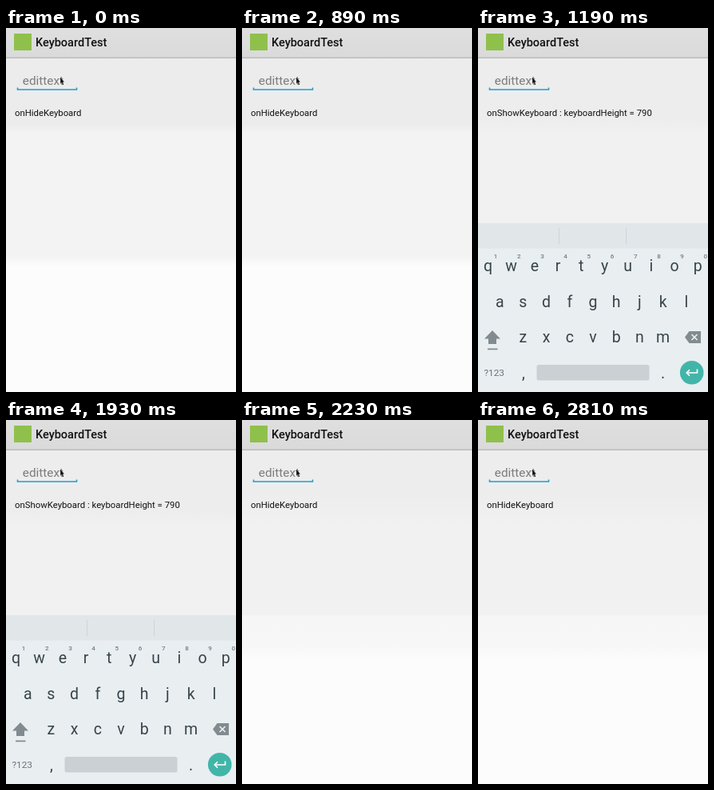
Animation, 288 px wide and 455 px high, one loop 2960 ms. Source, as an HTML page:

```html
<!DOCTYPE html>
<html lang="en">
<head>
<meta charset="utf-8">
<title>Keyboard test</title>
<style>
  html, body { margin: 0; width: 100%; height: 100%; overflow: hidden; background: #fbfbfb; }
  svg { display: block; width: 288px; height: 455px; font-family: Roboto, sans-serif; }
  .keys { font-size: 19.5px; fill: #37444a; text-anchor: middle; }
  .digits { font-size: 8px; font-weight: 500; fill: #737e83; text-anchor: middle; }
</style>
</head>
<body>
<svg viewBox="0 0 288 455">
  <defs>
    <linearGradient id="bar" x2="0" y2="1">
      <stop stop-color="#dfdfdf"/><stop offset="1" stop-color="#dadada"/>
    </linearGradient>
    <linearGradient id="idle" gradientUnits="userSpaceOnUse" x1="0" y1="0" x2="0" y2="455">
      <stop offset=".262" stop-color="#ececec"/><stop offset=".29" stop-color="#f3f3f3"/>
      <stop offset=".624" stop-color="#f3f3f3"/><stop offset=".655" stop-color="#fcfcfc"/>
    </linearGradient>
    <linearGradient id="shrunk" gradientUnits="userSpaceOnUse" x1="0" y1="0" x2="0" y2="455">
      <stop offset=".2" stop-color="#ededed"/><stop offset=".29" stop-color="#f1f1f1"/>
      <stop offset=".536" stop-color="#f1f1f1"/><stop offset=".536" stop-color="#f6f6f6"/>
      <stop offset=".62" stop-color="#f7f7f7"/><stop offset=".66" stop-color="#fcfcfc"/>
    </linearGradient>
    <linearGradient id="open" gradientUnits="userSpaceOnUse" x1="0" y1="0" x2="0" y2="455">
      <stop offset=".25" stop-color="#ededed"/><stop offset=".29" stop-color="#f1f1f1"/>
      <stop offset=".552" stop-color="#f1f1f1"/><stop offset=".552" stop-color="#fafafa"/>
    </linearGradient>
  </defs>

  <rect id="page" width="288" height="455"/>
  <rect width="288" height="37" fill="url(#bar)"/>
  <rect y="36.5" width="288" height="1.5" fill="#bbb"/>
  <rect x="10" y="7" width="22" height="21" fill="#8fc04b"/>
  <text x="37" y="23" font-size="14.5" font-weight="500" fill="#111">KeyboardTest</text>

  <text x="20.8" y="71" font-size="15.3" fill="#7c7c7c">edittext</text>
  <path d="M14.5 74.5V77H88.5V74.5" fill="none" stroke="#209fd0" stroke-width="1.6"/>
  <rect id="caret" x="20" y="55" width="1.6" height="20" fill="#209fd0"/>
  <path d="M68.2 62V69.2L69.8 67.8L71.2 71L72.2 70.5L70.9 67.4H73Z" fill="#111"/>
  <text id="status" x="11" y="109.5" font-size="11.35" fill="#111"></text>

  <g id="keyboard">
    <rect y="244" width="288" height="220" fill="#e9eef1"/>
    <rect y="244" width="288" height="31.5" fill="#e1e6e9"/>
    <path d="M101.5 250V270M185.5 250V270" stroke="#cdd3d6"/>
    <g id="keys" class="keys"></g>
    <g id="digits" class="digits"></g>
    <path d="M18 378L28 388.5H23V395H13V388.5H8ZM12 400.5H24.5V402.2H12Z" fill="#818b90"/>
    <path d="M259 386.5L264.5 379H279V394H264.5Z" fill="#818b90"/>
    <path d="M267.5 383L274.5 390M274.5 383L267.5 390" stroke="#eef2f4" stroke-width="1.6"/>
    <text x="7.5" y="435" font-size="11.8" fill="#687379">?123</text>
    <rect x="73.5" y="421" width="141" height="19.5" rx="2.5" fill="#cad0d3"/>
    <circle cx="267.7" cy="430.7" r="14.8" fill="#42b5a9"/>
    <path d="M274.5 426.5V431H261.5M265 427.2L261.2 431L265 434.8" fill="none" stroke="#fff" stroke-width="1.6"/>
  </g>
</svg>
<script>
  const $ = id => document.getElementById(id);
  const label = (x, y, s) => `<text x="${x}" y="${y}">${s}</text>`;
  const row = (s, x, y) => [...s].map((c, i) => label(x + i * 29.2, y, c)).join("");

  $("keys").innerHTML = row("qwertyuiop", 12.5, 304) + row("asdfghjkl", 27.2, 349)
    + row("zxcvbnm", 56.4, 393) + label(57, 438, ",") + label(231.5, 438, ".");
  $("digits").innerHTML = row("1234567890", 22, 288);

  const LOOP = 2960;
  const blinks = [[450, 890], [1340, 1930], [2370, 2810]];
  const within = (t, a, b) => t >= a && t < b;

  function draw(now) {
    const t = now % LOOP;
    const open = within(t, 1040, 2230);
    const rising = within(t, 1040, 1190);
    const page = open ? "open" : t < 1040 ? "idle" : "shrunk";
    $("page").setAttribute("fill", `url(#${page})`);
    $("caret").style.opacity = blinks.some(([a, b]) => within(t, a, b)) ? 1 : 0;
    $("status").textContent = within(t, 1040, 2080)
      ? "onShowKeyboard : keyboardHeight = 790" : "onHideKeyboard";

    const kb = $("keyboard");
    kb.style.display = open ? "" : "none";
    kb.setAttribute("transform", `translate(0 ${rising ? 7 : 0})`);
    kb.setAttribute("opacity", rising ? 0.84 : t < 2080 ? 1 : 0.95);
  }

  const start = performance.now();
  function tick() {
    draw(performance.now() - start);
    requestAnimationFrame(tick);
  }
  tick();
</script>
</body>
</html>
```
